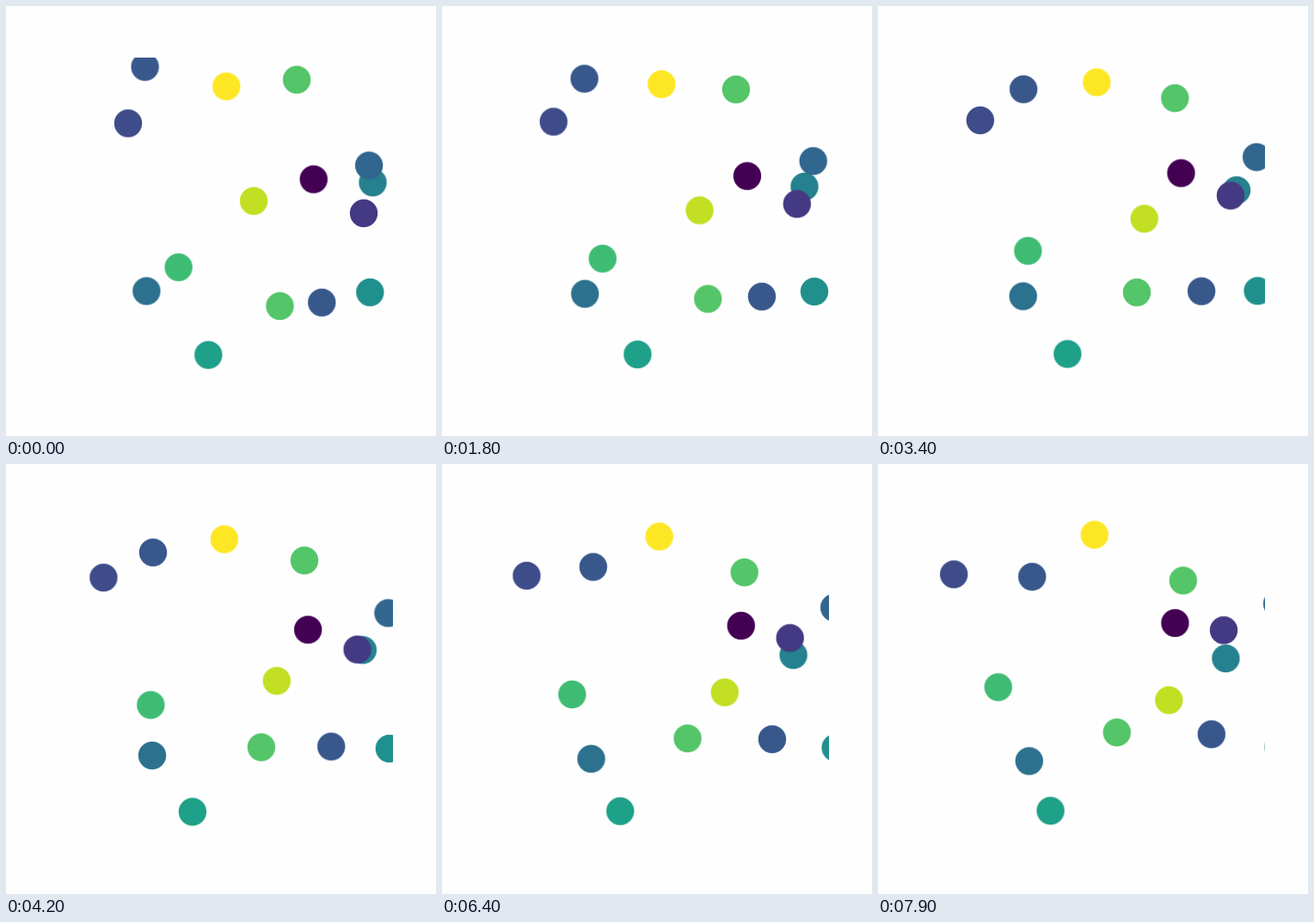
Write an HTML page that moves like this. It is 500x500 px and loops after 8 s.

```html
<!DOCTYPE html>
<html lang="en">
<head>
<meta charset="utf-8">
<title>Drifting dots</title>
<style>
  html, body { margin: 0; width: 100%; height: 100%; overflow: hidden; background: #fefefe; }
  svg { display: block; width: 500px; height: 500px; }
  /* 80 positions of 100 ms each, both ends included */
  circle { animation: drift 8s steps(80, jump-none) infinite; }
  @keyframes drift {
    from { transform: translate(var(--x0), var(--y0)); }
    to { transform: translate(var(--x1), var(--y1)); }
  }
</style>
</head>
<body>
<svg viewBox="0 0 500 500">
  <clipPath id="plot"><rect x="62.5" y="60" width="387.5" height="385"/></clipPath>
  <g id="dots" clip-path="url(#plot)"></g>
</svg>
<script>
  // colour, start x, start y, end x, end y; later dots lie on top
  const dots = [
    ['#26818e', 426.5, 205.2, 404.4, 226.1],
    ['#31668e', 422.1, 185.5, 464.1, 162.6],
    ['#443a83', 416, 241, 402, 193.3],
    ['#38588c', 161.6, 70.8, 179.2, 131.1],
    ['#fde725', 256.3, 93.5, 251.8, 82.2],
    ['#54c568', 338.1, 85.7, 354.8, 135.5],
    ['#3e4c8a', 142, 136.4, 88.2, 128.3],
    ['#440154', 357.7, 201.5, 345.4, 184.9],
    ['#c2df23', 288.1, 226.7, 338.3, 274.6],
    ['#3fbc73', 200.6, 303.8, 139.8, 259.5],
    ['#2c718e', 163.4, 331.5, 175.8, 345.4],
    ['#54c568', 318.5, 348.9, 277.8, 312.1],
    ['#38588c', 367.2, 344.8, 387.8, 314.2],
    ['#20908d', 423.3, 332.9, 465.6, 329.2],
    ['#1fa088', 235.3, 405.7, 200.6, 403.2]
  ];
  const group = document.getElementById('dots');
  for (const [color, ...ends] of dots) {
    const dot = document.createElementNS('http://www.w3.org/2000/svg', 'circle');
    dot.setAttribute('r', 16.2);
    dot.setAttribute('fill', color);
    ['--x0', '--y0', '--x1', '--y1'].forEach((name, i) => dot.style.setProperty(name, ends[i] + 'px'));
    group.append(dot);
  }
</script>
</body>
</html>
```
